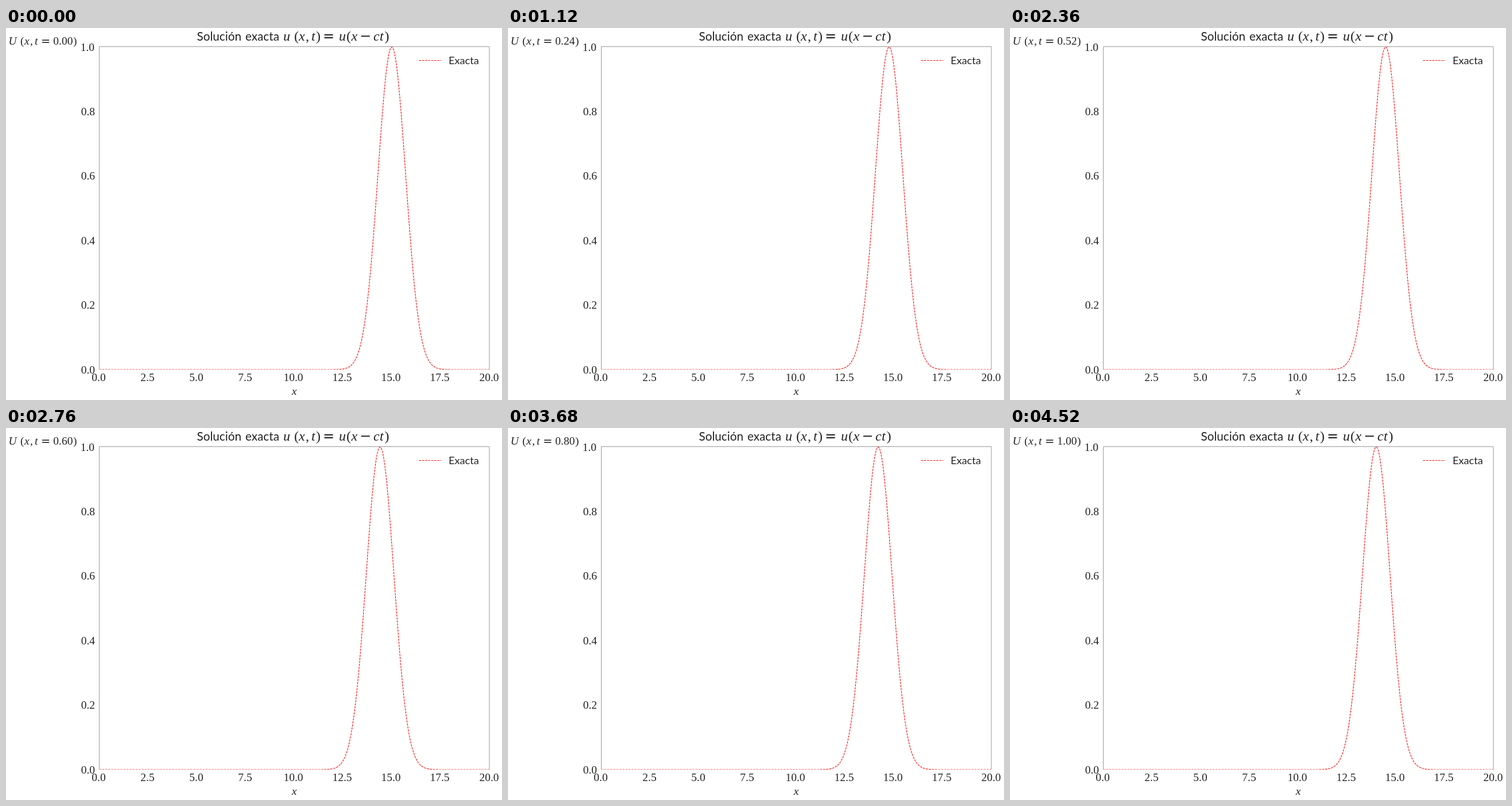
Write an HTML page that moves like this. It is 864x648 px and loops after 4.62 s.

```html
<!DOCTYPE html>
<html lang="es">
<head>
<meta charset="utf-8">
<style>
  html, body { margin: 0; width: 100%; height: 100%; overflow: hidden; background: #fff; }
  svg { display: block; }
  text { font: 19.5px "Liberation Serif", serif; fill: #222; white-space: pre; }
  .sans { font-family: Lato, sans-serif; }
  .op { font-family: "DejaVu Sans", sans-serif; }
  .it { font-style: italic; }
  .title { font-size: 24px; }
  .mid { text-anchor: middle; }
  .end { text-anchor: end; }
  .dash { fill: none; stroke: #f00; stroke-width: 1.1; stroke-dasharray: 3.7 1.6; }
</style>
</head>
<body>
<svg id="plot" width="864" height="648" viewBox="0 0 864 648">
  <clipPath id="box"><rect x="162" y="33" width="680" height="562"/></clipPath>
  <path id="curve" class="dash" clip-path="url(#box)"/>
  <path d="M162.5 595V32.5H842V595" fill="none" stroke="#999"/>
  <path class="dash" d="M719.5 56.5H758"/>
</svg>
<script>
const plot = document.getElementById('plot');
const curve = document.getElementById('curve');
const LEFT = 162, BOTTOM = 595, UNIT = 34, HEIGHT = 562;

function label(x, y, str, cls = '') {
  const el = document.createElementNS(plot.namespaceURI, 'text');
  el.setAttribute('x', x);
  el.setAttribute('y', y);
  el.setAttribute('class', cls);
  el.textContent = str;
  plot.append(el);
  return el;
}

// Ticks align by their ink, so the side bearing of a leading 1 is taken off.
function tick(x, y, value, cls) {
  const str = value.toFixed(1);
  label(str[0] === '1' ? x - 1 : x, y, str, cls);
}

// Formula pieces: [x, string]; letters are italic, operators are wide.
function formula(y, cls, parts) {
  for (const [x, str] of parts) {
    const style = /[a-z]/i.test(str) ? ' it' : /[=−]/.test(str) ? ' op' : '';
    label(x, y, str, cls + style);
  }
}

for (let i = 0; i <= 8; i++) tick(LEFT - 0.5 + i * 85, 615, i * 2.5, 'mid');
for (let i = 0; i <= 5; i++) tick(155, 601.5 - i * 112.4, i / 5, 'end');

label(502, 638.5, 'x', 'mid it');
label(771, 63, 'Exacta', 'sans').style.fontSize = '18.2px';
for (const [x, word] of [[332.5, 'Solución'], [417, 'exacta']])
  label(x, 22, word, 'sans').style.fontSize = '20.7px';
formula(22, 'title', [
  [483, 'u'], [502, '('], [510, 'x'], [522, ','], [532, 't'], [540, ')'], [552, '='],
  [580, 'u'], [593, '('], [601.5, 'x'], [616, '−'], [640, 'c'], [651, 't'], [659.5, ')']
]);
formula(28.5, '', [
  [4.5, 'U'], [25, '('], [32, 'x'], [42, ','], [50, 't'], [61, '='], [117, ')']
]);
const clock = label(82.3, 28.5, '');

// Most steps hold for 100 ms, a few for only 20 ms.
const LOOP = 4620, SHORT = [6, 13, 25, 33, 40, 48];

function stepAt(ms) {
  let i = 0;
  for (let hold; ms >= (hold = SHORT.includes(i) ? 20 : 100); i++) ms -= hold;
  return i;
}

function draw() {
  const t = stepAt(performance.now() % LOOP) * 0.02;
  let d = '';
  for (let i = 0; i <= 400; i++) {
    const x = i / 20, u = Math.exp(-((x - 15 + t) ** 2));
    d += (i ? 'L' : 'M') + (LEFT + x * UNIT).toFixed(2) + ' ' + (BOTTOM - u * HEIGHT).toFixed(2);
  }
  curve.setAttribute('d', d);
  clock.textContent = t.toFixed(2);
  requestAnimationFrame(draw);
}
draw();
</script>
</body>
</html>
```
